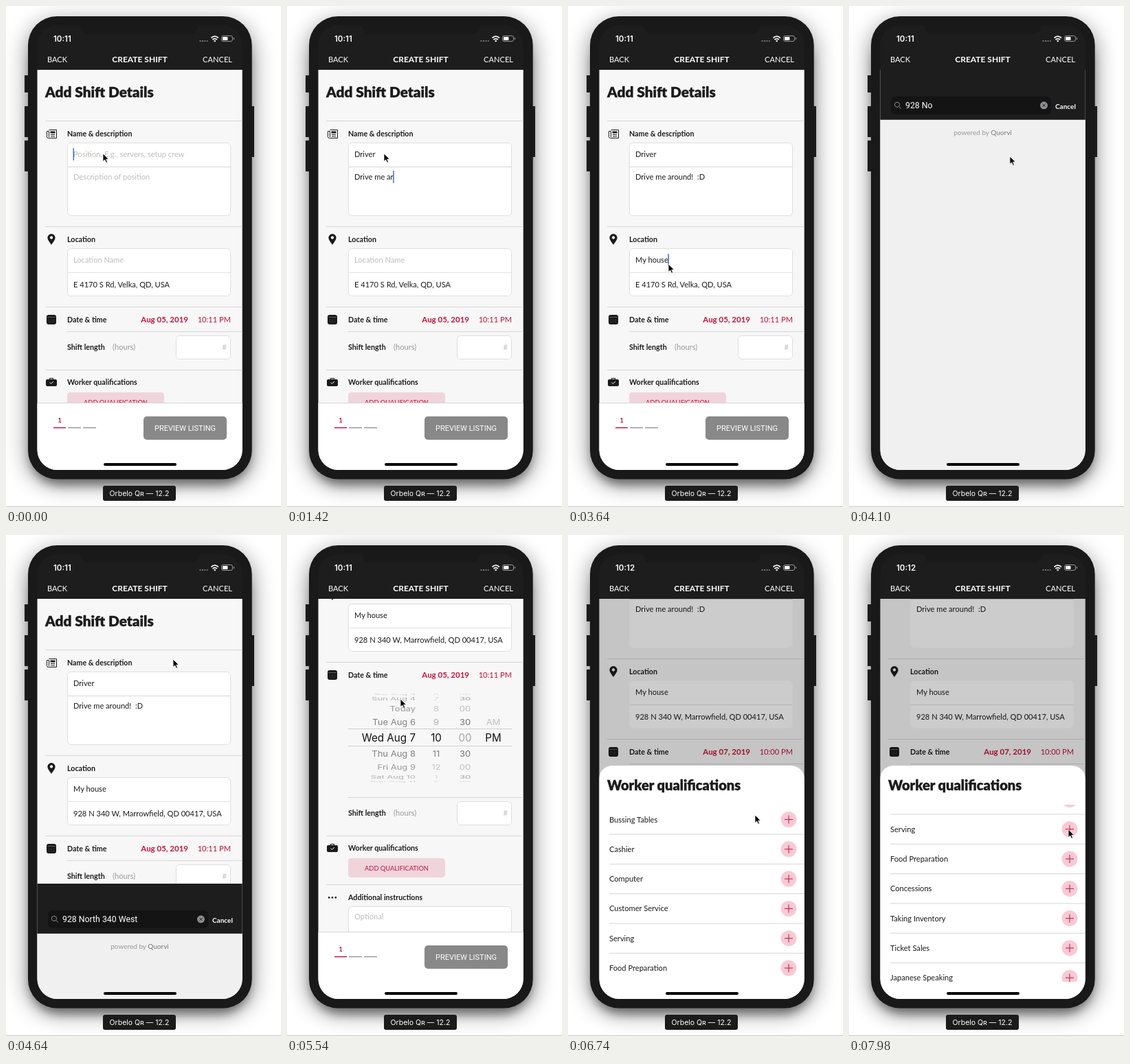
An HTML page that plays this animation: 400 px wide and 730 px high, repeating every 8 s.

```html
<!DOCTYPE html>
<html lang="en">
<head>
<meta charset="utf-8">
<title>Create shift</title>
<style>
html, body { margin: 0; width: 100%; height: 100%; overflow: hidden; background: #fff; }
svg { display: block; width: 100vw; height: 100vh; }
text { font: 400 11.1px Lato, sans-serif; fill: #1b1b1b; white-space: pre; }
.sys { font-family: Inter, sans-serif; }
.bold { font-weight: 700; font-size: 10.7px; }
.title { font-weight: 900; font-size: 20.8px; stroke: #1b1b1b; stroke-width: .35; }
.white { fill: #fff; }
.red { fill: #c4123b; }
.hint { fill: #bdbdbd; }
.grey { fill: #999; }
.mid { text-anchor: middle; }
.end { text-anchor: end; }
.box { fill: #fff; stroke: #dedede; }
.rule { stroke: #d6d6d6; fill: none; }
.icon { fill: #1b1b1b; }
.thin { fill: none; stroke: #1b1b1b; }

#pointer, #form, #lower, #picker, #search, #sheet, #dim, #list, .box { animation: 8s linear infinite; }
#pointer { animation-name: point; animation-timing-function: ease-in-out; }
#form { animation-name: scroll; animation-timing-function: ease-out; }
#lower { animation-name: push; animation-timing-function: ease-out; }
#picker { animation-name: reveal; }
#search { animation-name: search; }
#sheet { animation-name: sheet; animation-timing-function: ease-out; }
#dim { animation-name: dim; }
#list { animation-name: list; }
.box { animation-name: outline; }

@keyframes point {
  0%, 26.9% { transform: translate(141px, 215px); }
  31.9%, 45.5% { transform: translate(146px, 376px); }
  47%, 48.2% { transform: translate(190px, 402px); }
  52.5%, 59% { transform: translate(243px, 181px); }
  61.2%, 62.4% { transform: translate(232px, 452px); }
  63% { transform: translate(200px, 485px); }
  65.5% { transform: translate(200px, 232px); }
  66.5% { transform: translate(165px, 285px); }
  69.2%, 71.2% { transform: translate(165px, 239px); }
  73%, 74.2% { transform: translate(235px, 201px); }
  78%, 79.5% { transform: translate(160px, 432px); }
  83.5%, 84.5% { transform: translate(272px, 408px); }
  87% { transform: translate(272px, 570px); }
  91.2%, 92.5% { transform: translate(272px, 418px); }
  97%, 100% { transform: translate(319px, 429px); }
}
@keyframes scroll {
  0%, 63% { transform: translateY(0); }
  65.8%, 74.2% { transform: translateY(-253px); }
  76.8%, 100% { transform: translateY(-141px); }
}
@keyframes push {
  0%, 61.5% { transform: translateY(0); }
  63.5%, 74.2% { transform: translateY(161px); }
  76.8%, 100% { transform: translateY(0); }
}
@keyframes reveal {
  0%, 61.8% { opacity: 0; }
  63.5%, 74.2% { opacity: 1; }
  76%, 100% { opacity: 0; }
}
@keyframes search {
  0%, 48% { transform: translateY(656px); animation-timing-function: ease-out; }
  52.5%, 55.5% { transform: translateY(0); animation-timing-function: ease-in; }
  58% { transform: translateY(486px); animation-timing-function: ease-out; }
  60%, 100% { transform: translateY(656px); }
}
@keyframes sheet {
  0%, 79.3% { transform: translateY(345px); }
  83%, 100% { transform: translateY(0); }
}
@keyframes dim {
  0%, 79.3% { opacity: 0; }
  83%, 100% { opacity: .2; }
}
@keyframes outline {
  0%, 79.3% { stroke-opacity: 1; }
  83%, 100% { stroke-opacity: 0; }
}
@keyframes list {
  0%, 87% { transform: translateY(0); }
  91.2% { transform: translateY(-152px); animation-timing-function: ease-out; }
  92.5%, 100% { transform: translateY(-159px); }
}
</style>
</head>
<body>
<svg viewBox="0 0 400 730">
  <defs>
    <filter id="soft" x="-30%" y="-20%" width="160%" height="140%"><feGaussianBlur stdDeviation="15"/></filter>
    <filter id="tight" x="-30%" y="-20%" width="160%" height="140%"><feGaussianBlur stdDeviation="7"/></filter>
    <clipPath id="screen"><path d="M45.5 20H343.7V647a29 29 0 0 1-29 29H74.5a29 29 0 0 1-29-29Z"/></clipPath>
    <clipPath id="page"><rect x="45" y="93" width="299" height="583"/></clipPath>
    <clipPath id="rows"><rect x="45" y="393" width="299" height="258"/></clipPath>
  </defs>

  <rect x="28" y="20" width="334" height="680" rx="48" opacity=".36" filter="url(#soft)"/>
  <rect x="35" y="40" width="320" height="658" rx="44" opacity=".4" filter="url(#tight)"/>
  <path d="M0 729.5H400" stroke="#c8c8c8"/>
  <path d="M27 101h6v25h-6zM27 146h6v45h-6zM27 196h6v45h-6zM356 146h5v74h-5z" fill="#1b1b1b"/>
  <rect x="32" y="15" width="325.7" height="674.5" rx="42" fill="#191919"/>

  <g clip-path="url(#screen)">
    <path d="M45 58a30 30 0 0 1 30-30h30q5 0 5 4a9 9 0 0 0 9 8H270a9 9 0 0 0 9-8q0-4 5-4h30a30 30 0 0 1 30 30V93H45Z" fill="#1d1d1d"/>
    <g clip-path="url(#page)">
      <rect x="45" y="93" width="299" height="583" fill="#f7f7f7"/>
      <g id="form">
        <text class="title" x="57" y="133">Add Shift Details</text>
        <path class="rule" d="M57 167.5H344M57 321.5H344M57 438.5H344"/>

        <path class="thin" d="M62.5 180.5H73.5V192.5H61.5a2 2 0 0 1-2-2V182.5H62.5V191M65 187.5h6M65 190h6"/>
        <path class="icon" d="M64.5 182.5h7v3h-7z"/>
        <text class="bold" x="89" y="190">Name &amp; description</text>
        <rect class="box" x="89.5" y="199.5" width="237" height="106" rx="5"/>
        <path class="rule" d="M89 234.5H327"/>

        <path class="icon" fill-rule="evenodd" d="M66 332a5.6 5.6 0 0 1 5.6 5.6C71.6 341 68 345 66 348 64 345 60.4 341 60.4 337.6A5.6 5.6 0 0 1 66 332Zm0 3.3a2.2 2.2 0 1 0 .01 0Z"/>
        <text class="bold" x="89" y="344">Location</text>
        <rect class="box" x="89.5" y="353.5" width="237" height="69" rx="5"/>
        <path class="rule" d="M90 388.5H326" opacity=".7"/>
        <g id="fields"></g>
        <text id="address" x="98" y="410"></text>
        <rect id="caret" width="1.5" height="18" fill="#3d6fdd"/>

        <rect class="icon" x="59" y="450" width="14" height="14" rx="3"/>
        <path d="M60 453.5h12" stroke="#777" stroke-width=".7"/>
        <path d="M62 457.5h8M62 460.5h8" stroke="#444" stroke-width=".8" stroke-dasharray="1.5 1.5"/>
        <text class="bold" x="89" y="461">Date &amp; time</text>
        <text id="date" class="bold red end" x="265" y="461" style="font-size:11.5px"></text>
        <text id="time" class="red end" x="327" y="461"></text>

        <g id="picker">
          <path d="M89 535.5H327M89 560.5H327" stroke="#cfcfcf"/>
          <g id="wheels"></g>
        </g>

        <g id="lower">
          <path class="rule" d="M89 474.5H344M57 530.5H344M57 601.5H344"/>
          <text class="bold" x="89" y="501">Shift length</text>
          <text class="grey" x="155" y="501">(hours)</text>
          <rect class="box" x="247.5" y="480.5" width="79" height="34" rx="5"/>
          <text class="hint end" x="321" y="501">#</text>
          <path class="icon" fill-rule="evenodd" d="M60 544h3v-2h6v2h3a2 2 0 0 1 2 2v6a2 2 0 0 1-2 2H60a2 2 0 0 1-2-2v-6a2 2 0 0 1 2-2Zm4.2 0h3.6v-1h-3.6Z"/>
          <path d="M63.5 548.5l2 2 3.5-3.5" fill="none" stroke="#f7f7f7"/>
          <text class="bold" x="89" y="552">Worker qualifications</text>
          <rect x="89" y="563" width="141" height="28" rx="4.5" fill="#f0d4dc"/>
          <text class="red mid" x="159.5" y="580.5" style="font-size:9.3px">ADD QUALIFICATION</text>
          <path class="icon" d="M60 619h2.4v2.4H60zM64.8 619h2.4v2.4h-2.4zM69.6 619H72v2.4h-2.4z"/>
          <text class="bold" x="89" y="624">Additional instructions</text>
          <rect class="box" x="89.5" y="633.5" width="237" height="72" rx="5"/>
          <text class="hint" x="98" y="652">Optional</text>
        </g>
      </g>

      <rect x="45" y="579" width="299" height="97" fill="#fff"/>
      <path class="rule" d="M45 578.5H344"/>
      <text class="bold red mid" x="78" y="607" style="font-size:9px">1</text>
      <path d="M69 614.5H87" stroke="#c4123b" stroke-width="1.5"/>
      <path d="M90 614.5H109M112 614.5H131" stroke="#999" stroke-width="1.5"/>
      <rect x="200" y="598" width="121" height="34" rx="5" fill="#888"/>
      <text class="white mid" x="260.5" y="619" style="font:400 11px Roboto,sans-serif">PREVIEW LISTING</text>
    </g>

    <text class="white" x="60" y="82">BACK</text>
    <text class="white bold mid" x="194.5" y="82" style="font-size:12px">CREATE SHIFT</text>
    <text class="white end" x="329" y="82">CANCEL</text>

    <rect id="dim" x="45" y="93" width="299" height="583"/>
    <g id="sheet">
      <path d="M45 700V356a20 20 0 0 1 20-20H324a20 20 0 0 1 20 20V700Z" fill="#fff"/>
      <text class="title" x="57" y="372" style="font-size:20px">Worker qualifications</text>
      <g clip-path="url(#rows)"><g id="list"></g></g>
    </g>

    <g id="search">
      <rect x="45" y="20" width="299" height="656" fill="#f0f0f0"/>
      <rect x="45" y="20" width="299" height="73" fill="#1d1d1d"/>
      <rect x="61" y="59" width="233" height="26" rx="6" fill="#141414"/>
      <g fill="none" stroke="#8e8e93"><circle cx="70" cy="71" r="3.6"/><path d="M72.7 73.7l3.3 3.3"/></g>
      <text id="query" class="white" x="82" y="76.5" style="font:400 12.3px Roboto,sans-serif"></text>
      <circle cx="283.5" cy="72" r="5.5" fill="#8e8e93"/>
      <path d="M281.5 70l4 4m0-4l-4 4" stroke="#1b1b1b"/>
      <text class="white bold" x="300" y="77" style="font-size:10px">Cancel</text>
      <text class="grey mid" x="194.5" y="115" style="font-size:10px">powered by <tspan fill="#777">Quorvi</tspan></text>
    </g>

    <text id="clock" class="sys white" x="69" y="52" style="font-weight:600;font-size:11.5px"></text>
    <path d="M281.5 51h12" stroke="#777" stroke-width="2" stroke-dasharray="2 1.5"/>
    <g fill="none" stroke="#fff" stroke-width="1.7">
      <path d="M298.5 46.5q5.2-4.6 10.4 0M300.5 49q3.2-2.8 6.4 0"/>
      <circle cx="303.7" cy="51" r=".5"/>
    </g>
    <rect x="313.5" y="43.5" width="16" height="8" rx="2.5" fill="none" stroke="#999"/>
    <rect x="315" y="45" width="7.5" height="5" rx="1" fill="#fff"/>
    <path d="M331.5 46v3" stroke="#999"/>
    <rect x="142" y="666" width="106" height="4" rx="2" fill="#000"/>
  </g>

  <rect x="141" y="699" width="106" height="22" rx="3" fill="#1b1b1b"/>
  <text class="sys white mid" x="194" y="714" style="font-size:10.5px">Orbelo Qʀ — 12.2</text>
  <path id="pointer" d="M0 0V11.5L2.7 9 4.6 13.2 6.5 12.4 4.7 8.3H8.3Z" fill="#000" stroke="#fff" stroke-width=".8"/>
</svg>

<script>
const LOOP = 8000;
const $ = id => document.getElementById(id);

function add(parent, tag, attrs, content = '') {
  const el = document.createElementNS('http://www.w3.org/2000/svg', tag);
  for (const key in attrs) el.setAttribute(key, attrs[key]);
  el.textContent = content;
  return parent.appendChild(el);
}

// from/to: focus period; start/step: typing rhythm in ms
const fields = [
  { text: 'Driver', hint: 'Position. E.g., servers, setup crew', y: 220, from: 0, to: 840, start: 180, step: 95 },
  { text: 'Drive me around!  :D', hint: 'Description of position', y: 253, from: 840, to: 2550, start: 860, step: 50 },
  { text: 'My house', hint: 'Location Name', y: 374, from: 2550, to: 3860, start: 2750, step: 100 }
];
for (const f of fields) f.el = add($('fields'), 'text', { x: 98, y: f.y });

const skills = ['Bussing Tables', 'Cashier', 'Computer', 'Customer Service', 'Serving',
  'Food Preparation', 'Concessions', 'Taking Inventory', 'Ticket Sales', 'Japanese Speaking'];
skills.forEach((name, i) => {
  const y = 414.5 + i * 43.3;
  add($('list'), 'text', { x: 60, y: y + 4 }, name);
  add($('list'), 'circle', { cx: 321, cy: y, r: 11.5, fill: '#f9cad5' });
  add($('list'), 'path', { d: `M315 ${y}h12M321 ${y - 6}v12`, stroke: '#c4123b' });
  add($('list'), 'path', { class: 'rule', d: `M60 ${y + 21.6}H344` });
});

const days = ['Thu Aug 1', 'Fri Aug 2', 'Sat Aug 3', 'Sun Aug 4', 'Today', 'Tue Aug 6',
  'Wed Aug 7', 'Thu Aug 8', 'Fri Aug 9', 'Sat Aug 10', 'Sun Aug 11'];
const wheels = [
  { x: 187, anchor: 'end', items: days, tone: () => 130 },
  { x: 217, items: [6, 7, 8, 9, 10, 11, 12, 1, 2], at: 4, tone: s => s === '11' ? 130 : 175 },
  { x: 259, items: ['00', '30', '00', '30', '00', '30', '00', '30', '00'], at: 4, tone: s => s === '30' ? 115 : 165 },
  { x: 300, items: ['AM', 'PM'], at: 1, tone: () => 190 }
];
for (const w of wheels)
  w.els = w.items.map(s => add($('wheels'), 'text', { class: 'sys', 'text-anchor': w.anchor || 'middle', dy: '.36em' }, s));

function turn(wheel, position) {
  wheel.els.forEach((el, i) => {
    const d = i - position, angle = d * 21 * Math.PI / 180;
    const centred = Math.abs(d) < 0.5, label = el.textContent;
    const grey = Math.min(215, wheel.tone(label) + Math.max(0, Math.abs(d) - 1) * 22);
    el.style.display = Math.abs(angle) < 1.5 ? '' : 'none';
    el.style.fontSize = centred ? '15.2px' : '13px';
    el.style.fill = centred && label !== '00' ? '#111' : `rgb(${grey},${grey},${grey})`;
    el.setAttribute('transform', `translate(${wheel.x} ${549 + 64 * Math.sin(angle)}) scale(1 ${Math.cos(angle)})`);
  });
}

const typed = (text, t, start, step) => text.slice(0, Math.max(0, Math.floor((t - start) / step)));

function smooth(t, from, to) {
  const p = Math.min(1, Math.max(0, (t - from) / (to - from)));
  return p * p * (3 - 2 * p);
}

function draw(t) {
  let focus;
  for (const f of fields) {
    const value = typed(f.text, t, f.start, f.step);
    f.el.textContent = value || f.hint;
    f.el.setAttribute('class', value ? '' : 'hint');
    if (t >= f.from && t < f.to) focus = { f, value };
  }
  $('caret').style.display = focus ? '' : 'none';
  if (focus) {
    $('caret').setAttribute('x', 97.5 + (focus.value ? focus.f.el.getComputedTextLength() : 0));
    $('caret').setAttribute('y', focus.f.y - 13);
  }
  $('address').textContent = t < 4440 ? 'E 4170 S Rd, Velka, QD, USA' : '928 N 340 W, Marrowfield, QD 00417, USA';
  $('query').textContent = typed('928 North 340 West', t, 3980, 18);
  $('date').textContent = t < 5700 ? 'Aug 05, 2019' : 'Aug 07, 2019';
  $('time').textContent = t < 5700 ? '10:11 PM' : '10:00 PM';
  $('clock').textContent = t < 6240 ? '10:11' : '10:12';
  wheels.forEach((w, i) => turn(w, i ? w.at : 4 + 2 * smooth(t, 5320, 5536)));
}

let begin;
function frame(now) {
  begin ??= now;
  draw((now - begin) % LOOP);
  requestAnimationFrame(frame);
}
draw(0);
requestAnimationFrame(frame);
</script>
</body>
</html>
```
